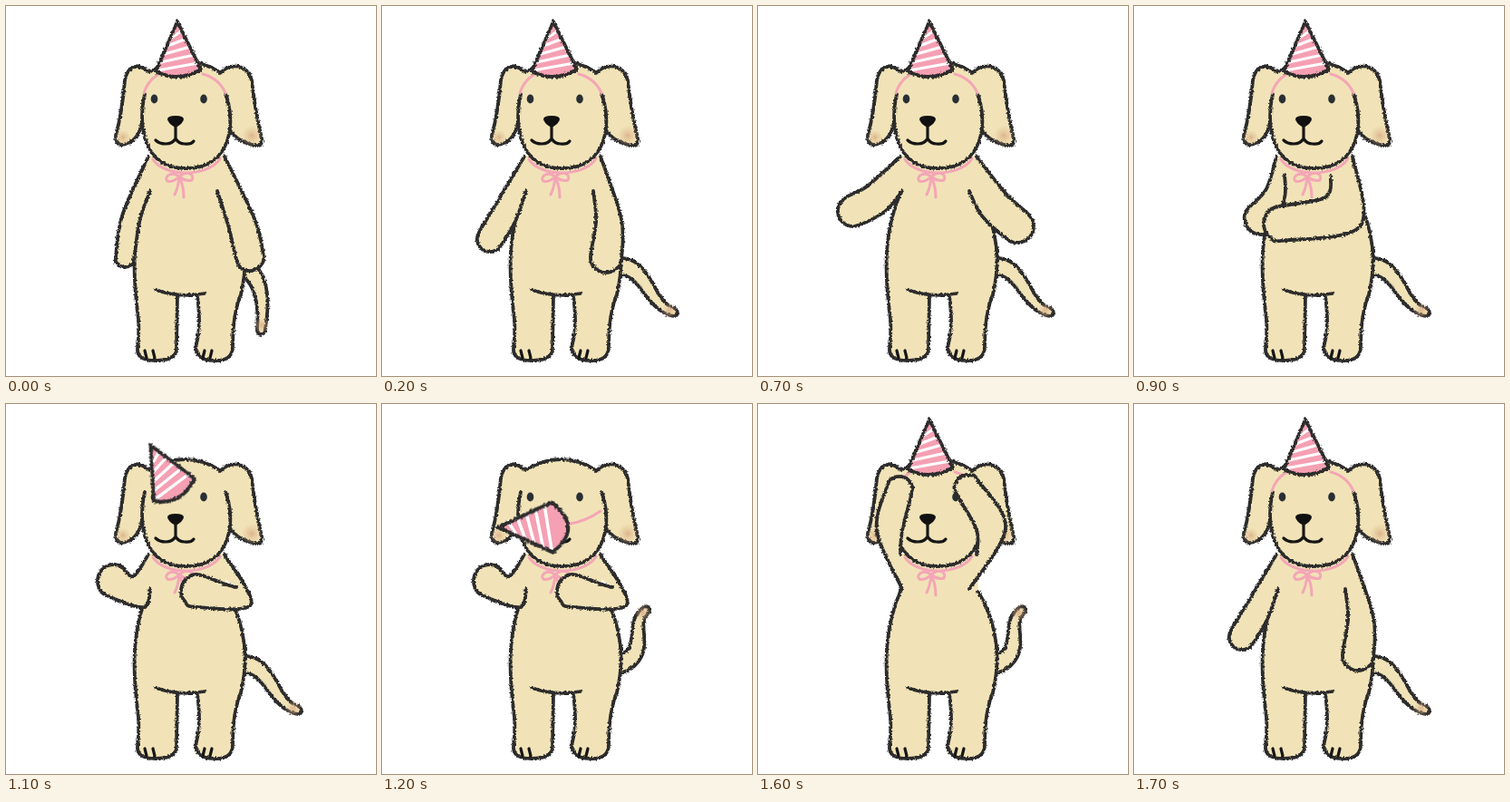
An HTML page for the animation above (1.8 s loop, 408 by 408 pixels).

```html
<!DOCTYPE html>
<html lang="en">
<head>
<meta charset="utf-8">
<title>Party puppy</title>
<style>
  html, body { margin: 0; width: 100%; height: 100%; overflow: hidden; background: #fff; }
  svg { display: block; width: 100vw; height: 100vh; }
  .fur { fill: #f1e3b7; }
  .ink { stroke: #2d2c2c; stroke-width: 3.8; filter: url(#crayon); }
  .line { fill: none; }
  .pink { fill: none; stroke: #f4a6b6; stroke-width: 3; }
  .face { fill: none; stroke: #161616; stroke-width: 3.2; }
</style>
</head>
<body>
<svg viewBox="0 0 408 408" stroke-linecap="round" stroke-linejoin="round">
  <defs>
    <filter id="crayon" filterUnits="userSpaceOnUse" x="-100" y="-100" width="608" height="608" color-interpolation-filters="sRGB">
      <feTurbulence type="fractalNoise" baseFrequency=".45" numOctaves="2" seed="4"/>
      <feDisplacementMap in="SourceGraphic" scale="3.5" xChannelSelector="R" yChannelSelector="G"/>
    </filter>
    <radialGradient id="tan">
      <stop offset="0" stop-color="#d3a078" stop-opacity=".7"/>
      <stop offset="1" stop-color="#e5c096" stop-opacity="0"/>
    </radialGradient>
  </defs>
  <g id="scene"></g>
</svg>
<script>
const LOOP = 1800;

const path = (cls, d) => `<path class="${cls}" d="${d}"/>`;
const tint = (x, y, r) => `<circle cx="${x}" cy="${y}" r="${r}" fill="url(#tan)"/>`;
const add = (p, v, k = 1) => [p[0] + v[0] * k, p[1] + v[1] * k];
const unit = v => v.map(c => c / Math.hypot(...v));
const heading = (a, b) => unit(add(b, a, -1));

// Smooth Catmull-Rom curve through points.
function curve(p) {
  const at = i => p[Math.max(0, Math.min(p.length - 1, i))];
  return p.slice(1).reduce((d, c, i) => {
    const c1 = add(p[i], add(c, at(i - 1), -1), 1 / 6);
    const c2 = add(c, add(at(i + 2), p[i], -1), -1 / 6);
    return `${d}C${c1} ${c2} ${c}`;
  }, `M${p[0]}`);
}

// An arm runs from shoulder and armpit past the elbow to a round hand.
// side is -1 for the left of the picture and 1 for the right.
function arm(side, elbow, hand, r, bend = r, pit = [196 + 37 * side, 204]) {
  const shoulder = [199 + 42 * side, 166];
  const root = add(shoulder, add(pit, shoulder, -1), .5);
  const fore = heading(elbow, hand);
  const across = d => [side * d[1], -side * d[0]];
  const out = across(unit(add(heading(root, elbow), fore)));
  const palm = [];
  for (let i = 0; i <= 4; i++) {
    const a = i * Math.PI / 4;
    palm.push(add(add(hand, across(fore), r * Math.cos(a)), fore, r * Math.sin(a)));
  }
  const d = curve([shoulder, add(elbow, out, bend), ...palm, add(elbow, out, -bend), pit]);
  return path('fur', `${d}L${200 + 35 * side} 188Z`) + path('ink line', d);
}

// A tapering tail along a cubic from the hip.
function tail(c1, c2, tip) {
  const p = [[262, 287], c1, c2, tip];
  const point = t => [0, 1].map(k =>
    p.reduce((sum, q, i) => sum + q[k] * [1, 3, 3, 1][i] * t ** i * (1 - t) ** (3 - i), 0));
  const left = [], right = [];
  for (let t = 0; t <= 1; t += .125) {
    const [dx, dy] = heading(point(t - .01), point(t + .01));
    left.push(add(point(t), [dy, -dx], 10 - 6 * t));
    right.unshift(add(point(t), [-dy, dx], 10 - 6 * t));
  }
  const end = add(tip, heading(c2, tip), 3);
  return path('fur ink', curve([...left, end, ...right])) + tint(...point(.92), 9);
}

const tails = {
  down: tail([283, 300], [285, 330], [281, 359]),
  mid: tail([292, 287], [294, 332], [323, 338]),
  up: tail([298, 275], [270, 240], [292, 227])
};

const arms = {
  down: arm(-1, [138, 233], [131, 278], 10) + arm(1, [260, 240], [269, 277], 15),
  lift: arm(-1, [135, 230], [119, 257], 14) + arm(1, [250, 236], [247, 277], 17, 14),
  open: arm(-1, [131, 212], [105, 226], 17) + arm(1, [260, 219], [286, 243], 18),
  bent: arm(-1, [146, 207], [119, 195], 18) + arm(1, [256, 210], [211, 206], 18, 18, [254, 202]),
  clasp: arm(-1, [156, 206], [140, 234], 18, 11, [166, 186]) +
    arm(1, [230, 227], [162, 240], 19, 25, [217, 188]),
  cover: arm(-1, [145, 148], [157, 108], 14) + arm(1, [257, 146], [215, 99], 11, 17),
  raised: arm(-1, [145, 140], [156, 94], 14) + arm(1, [257, 138], [231, 92], 14, 16)
};

const leftSide = 'M158 204C140 245 138 285 146 345Q147 362 145 378Q144 391 165 391Q187 391 188 378L189 319';
const rightSide = 'M211 320Q215 350 211 368Q204 391 230 391Q250 392 250 375Q250 340 259 318C267 285 266 245 243 207';
const toes = [153, 162, 219, 227].map(x => path('face', `M${x} 380l${x < 200 ? 2 : -2} 8`)).join('');
const body = path('fur', `${leftSide}L${rightSide.slice(1)}L241 165L157 165Z`) +
  path('ink line', leftSide + rightSide + 'M165 313Q190 322 219 317') + toes;

const collar = path('pink', 'M162 169C174 189 224 189 236 168' +
  'M191 188C180 181 174 190 178 193Q184 195 191 188C202 180 208 187 205 192Q198 194 191 188' +
  'Q190 200 186 208M191 189Q196 198 196 211');

const crown = 'M158 73Q197 49 236 73';
const jaw = 'M153 97C146 125 148 179 198 179C251 179 253 125 242 97';
const ears = 'M158 73C146 62 134 66 131 82Q128 118 121 143Q121 153 128 153C140 152 148 142 150 127' +
  'M236 74C248 62 266 64 271 82Q275 118 282 146Q283 155 276 154C264 152 252 146 247 137';
const eyes = [163.5, 218].map(x => `<ellipse cx="${x}" cy="102.5" rx="3.8" ry="5" fill="#2a2f33"/>`).join('');
const head = path('fur', crown + 'L242 97' + 'C253 125 251 179 198 179C148 179 146 125 153 97Z') +
  path('ink line', crown) + path('fur ink', ears) + tint(129, 145, 9) + tint(271, 143, 12) +
  path('ink line', jaw) + eyes +
  '<path d="M178 125Q178 121 187 121Q196 121 196 125Q195 130 187 134Q179 130 178 125Z" fill="#111"/>' +
  path('face', 'M187 132V146Q184 152 176 152Q169 152 165 148M187 146Q190 152 197 152Q204 153 207 149');

// slip 0 wears the hat on top, 1 over the nose.
function hat(slip) {
  const angle = -89 * slip;
  const x = 190 + 2 * slip - 16 * slip * (1 - slip);
  const y = 75 + 61 * slip ** .8;
  const cone = `M-1-58L-25-3Q0 ${10 - angle * .2} 25-5Z`;
  let stripes = '';
  for (let s = -7; s > -46; s -= 9) stripes += `M${-.43 * (s + 61)} ${s + 3}L${.47 * (s + 53)} ${s - 5}`;
  return `<g transform="translate(${x} ${y}) rotate(${angle}) scale(${1 + .1 * slip})">
    <path d="${cone}" fill="#f5a0b3"/>
    <path d="${stripes}" stroke="#fff" stroke-width="3.2"/>
    ${path('ink line', cone)}</g>`;
}

function strap(slip) {
  if (slip === 0) return path('pink', 'M167 76Q156 83 152 96M217 75Q235 80 242 96');
  return slip === 1 ? path('pink', 'M203 133Q224 130 241 118') : '';
}

// start ms, arms, tail, hat slip
const steps = [
  [0, 'down', 'down', 0],
  [200, 'lift', 'mid', 0],
  [300, 'bent', 'mid', 0],
  [400, 'clasp', 'up', 0],
  [600, 'bent', 'mid', 0],
  [700, 'open', 'mid', 0],
  [800, 'bent', 'down', 0],
  [900, 'clasp', 'mid', 0],
  [1100, 'bent', 'mid', .3],
  [1200, 'bent', 'up', 1],
  [1300, 'cover', 'mid', .65],
  [1400, 'cover', 'down', .3],
  [1500, 'raised', 'mid', .1],
  [1600, 'raised', 'up', 0],
  [1700, 'lift', 'mid', 0]
];

const scene = document.getElementById('scene');
let shown = null;

function draw(time) {
  const step = steps.findLast(s => s[0] <= time);
  if (step === shown) return;
  shown = step;
  const [, pose, wag, slip] = step;
  const face = head + strap(slip);
  const handsOnFace = pose === 'cover' || pose === 'raised';
  scene.innerHTML = tails[wag] + body + collar +
    (handsOnFace ? face + arms[pose] : arms[pose] + face) + hat(slip);
}

function tick() {
  draw(performance.now() % LOOP);
  requestAnimationFrame(tick);
}
tick();
</script>
</body>
</html>
```
